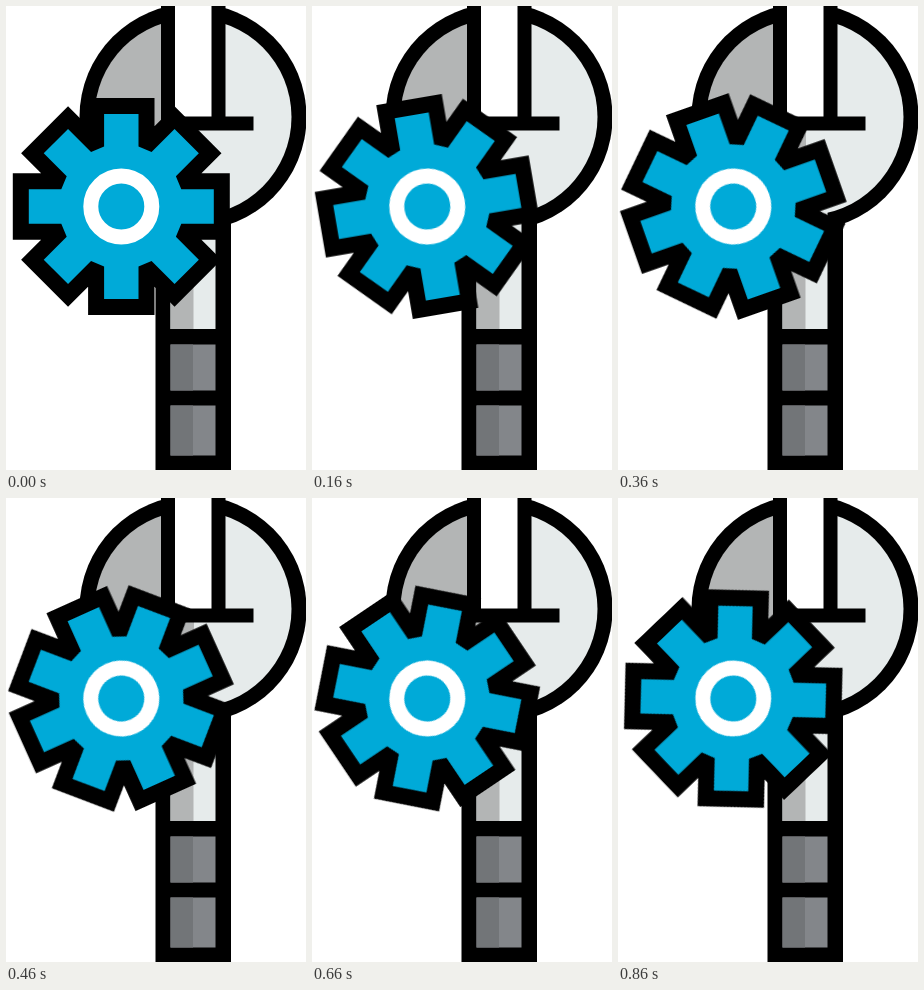
These frames come from a looping animation (300x464 px, 960 ms). An HTML page:

```html
<!DOCTYPE html>
<html lang="en">
<head>
<meta charset="utf-8">
<title>Gear and wrench</title>
<style>
  html, body { margin: 0; width: 100%; height: 100%; overflow: hidden; background: #fff; }
  svg { display: block; width: 100vw; height: 100vh; }
  .light { fill: #e6ebeb; }
  .shade { fill: #b3b5b5; }
  .grip { fill: #83868a; }
  .grip-shade { fill: #727578; }
  #gear {
    --step: -4.85deg;
    transform-origin: 115.3px 200.5px;
    animation: turn 960ms step-end infinite;
  }
  /* about one tooth pitch per loop, held in hard steps */
  @keyframes turn {
    0%       { transform: rotate(0deg); }
    6.25%    { transform: rotate(var(--step)); }
    16.6667% { transform: rotate(calc(2 * var(--step))); }
    27.0833% { transform: rotate(calc(3 * var(--step))); }
    37.5%    { transform: rotate(calc(4 * var(--step))); }
    47.9167% { transform: rotate(calc(5 * var(--step))); }
    58.3333% { transform: rotate(calc(6 * var(--step))); }
    68.75%   { transform: rotate(calc(7 * var(--step))); }
    79.1667% { transform: rotate(calc(8 * var(--step))); }
    89.5833%, 100% { transform: rotate(calc(9 * var(--step))); }
  }
</style>
</head>
<body>
<svg viewBox="0 0 300 464" preserveAspectRatio="none">
  <defs>
    <clipPath id="inner"><circle cx="187" cy="111" r="98.5"/></clipPath>
  </defs>

  <g id="wrench">
    <circle cx="187" cy="111" r="113.5"/>
    <rect x="149.5" y="205" width="75.5" height="259"/>
    <g clip-path="url(#inner)">
      <rect class="light" x="187" y="0" width="113" height="230"/>
      <rect class="shade" x="74" y="0" width="114" height="230"/>
    </g>
    <path d="M155 0H219.5V110.5H247.5V124.5H155Z"/>
    <rect x="169" y="0" width="36.5" height="110.5" fill="#fff"/>

    <rect class="light" x="164.5" y="190" width="45" height="133"/>
    <rect class="shade" x="164.5" y="190" width="23" height="133"/>
    <rect class="grip" x="164.5" y="338.5" width="45" height="46"/>
    <rect class="grip-shade" x="164.5" y="338.5" width="22.5" height="46"/>
    <rect class="grip" x="164.5" y="399.5" width="45" height="50"/>
    <rect class="grip-shade" x="164.5" y="399.5" width="22.5" height="50"/>
  </g>

  <g id="gear">
    <path id="teeth" fill="#00aad8" stroke="#000" stroke-width="32" stroke-miterlimit="8" paint-order="stroke"/>
    <circle cx="115.3" cy="200.5" r="30.5" fill="none" stroke="#fff" stroke-width="15"/>
  </g>
</svg>
<script>
  const TEETH = 8, HALF = 17.2, TIP = 92.5, ROOT = 60;
  const points = [];
  for (let i = 0; i < TEETH; i++) {
    const a = i * 2 * Math.PI / TEETH, c = Math.cos(a), s = Math.sin(a);
    for (const [x, y] of [[-HALF, -ROOT], [-HALF, -TIP], [HALF, -TIP], [HALF, -ROOT]]) {
      points.push((115.3 + x * c - y * s).toFixed(2) + ' ' + (200.5 + x * s + y * c).toFixed(2));
    }
  }
  document.getElementById('teeth').setAttribute('d', 'M' + points.join('L') + 'Z');
</script>
</body>
</html>
```
